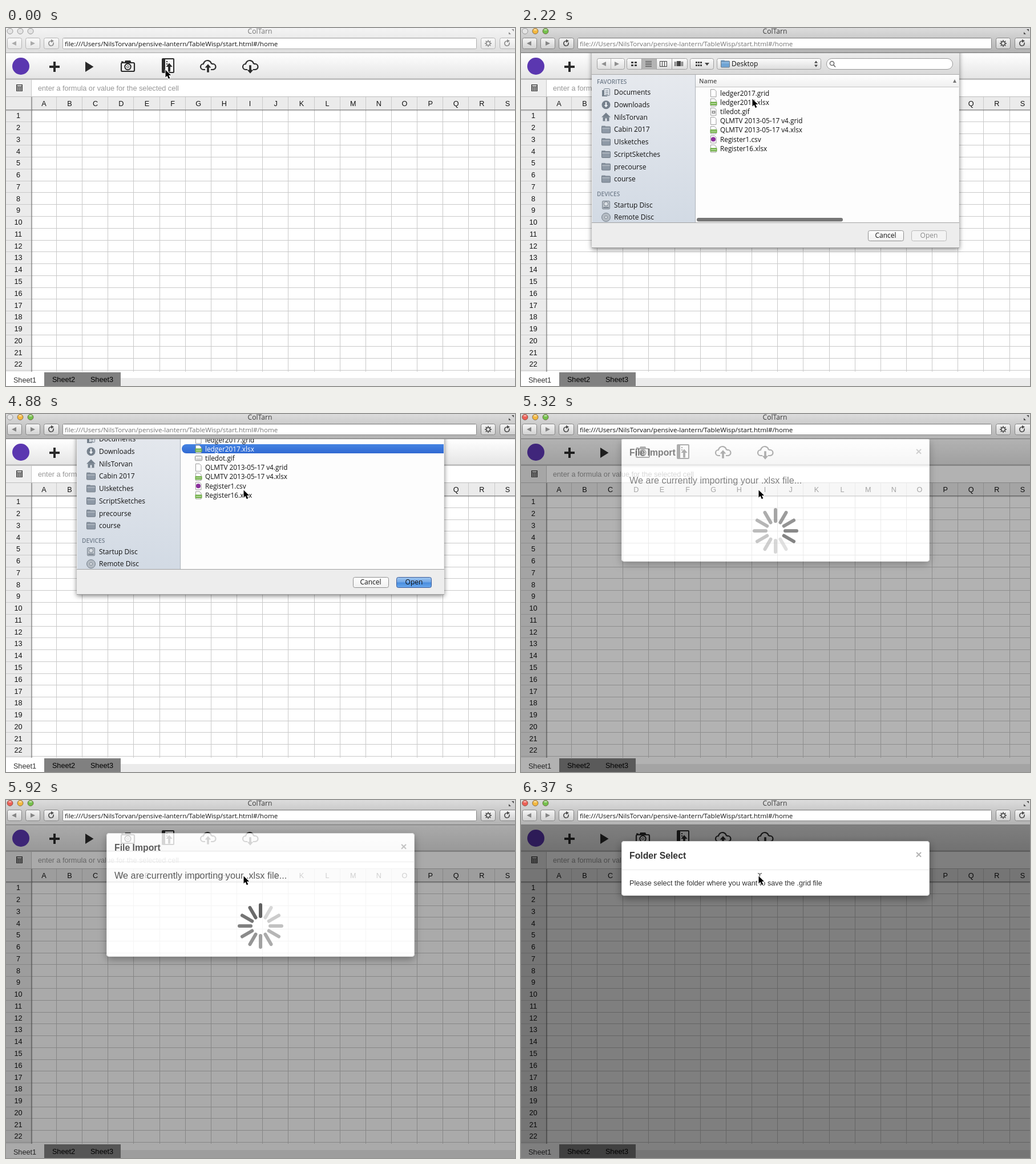
Write an HTML page with a canvas that moves like this. It is 892 px wide and 628 px high and loops after 8000 ms.

```html
<!DOCTYPE html>
<html lang="en">
<head>
<meta charset="utf-8">
<title>Spreadsheet import</title>
<style>
html, body { margin: 0; width: 892px; height: 628px; overflow: hidden; background: #fff; }
canvas { display: block; }
</style>
</head>
<body>
<canvas id="stage" width="892" height="628"></canvas>
<script>
const c = document.getElementById('stage').getContext('2d');
const W = 892, H = 628, TOP = 44, LOOP = 8000, STEP = 147.9;
const UI = '"Open Sans", "Noto Sans", sans-serif';
const PAGE = '"Liberation Sans", Arial, sans-serif';
const INK = '#2b2b2b';

const clamp = v => Math.max(0, Math.min(1, v));
const ease = v => Math.sin(clamp(v) * Math.PI / 2) ** 2;
const mix = (a, b, p) => a + (b - a) * p;

// ---- helpers ----
function rect(x, y, w, h, fill) { c.fillStyle = fill; c.fillRect(x, y, w, h); }
function grad(y0, y1, a, b) {
  const g = c.createLinearGradient(0, y0, 0, y1);
  g.addColorStop(0, a); g.addColorStop(1, b);
  return g;
}
function round(x, y, w, h, r, fill, line) {
  c.beginPath(); c.roundRect(x, y, w, h, r);
  if (fill) { c.fillStyle = fill; c.fill(); }
  if (line) { c.strokeStyle = line; c.lineWidth = 1; c.stroke(); }
}
function circle(x, y, r, fill, line, lw = 1) {
  c.beginPath(); c.arc(x, y, r, 0, 7);
  if (fill) { c.fillStyle = fill; c.fill(); }
  if (line) { c.strokeStyle = line; c.lineWidth = lw; c.stroke(); }
}
function poly(pts, fill, line, lw = 1) {
  c.beginPath();
  for (let i = 0; i < pts.length; i += 2) c.lineTo(pts[i], pts[i + 1]);
  c.closePath();
  if (fill) { c.fillStyle = fill; c.fill(); }
  if (line) { c.strokeStyle = line; c.lineWidth = lw; c.stroke(); }
}
function text(s, x, cy, size, color, font = UI, align = 'left', weight = '') {
  c.font = `${weight} ${size}px ${font}`;
  c.textAlign = align;
  c.fillStyle = color;
  c.fillText(s, x, cy + size * 0.36);
}
function arrow(x, y, dir, color, s = 1) {
  c.save();
  c.translate(x, y); c.scale(s, s * dir);
  poly([0, -8, 6, -1, 2, -1, 2, 8, -2, 8, -2, -1, -6, -1], color);
  c.restore();
}

// ---- browser window ----
function button(x, w, on) {
  round(x + .5, 17.5, w, 19, 3, grad(17, 37, on ? '#f6f6f6' : '#fafafa', on ? '#cfcfcf' : '#e6e6e6'), on ? '#858585' : '#b4b4b4');
}
function reload(x, color) {
  c.beginPath(); c.arc(x, 27, 4.2, -.4, 4.9);
  c.strokeStyle = color; c.lineWidth = 1.6; c.stroke();
  poly([x, 19.8, x + 5, 22.8, x, 25.8], color);
}
function gear(x, y, color) {
  c.strokeStyle = color; c.lineWidth = 1.6;
  for (let i = 0; i < 8; i++) {
    const a = i * Math.PI / 4, u = Math.cos(a), v = Math.sin(a);
    c.beginPath(); c.moveTo(x + u * 3.5, y + v * 3.5); c.lineTo(x + u * 6, y + v * 6); c.stroke();
  }
  circle(x, y, 3.3, null, color, 1.5);
}
function chrome(on, sheet) {
  rect(0, 0, W, TOP, on ? grad(0, 43, '#dcdcdc', '#b2b2b2') : grad(0, 43, '#f4f4f4', '#dedede'));
  rect(0, 43, W, 1, on ? '#747474' : '#a6a6a6');
  ['#ed5f56', '#f3b83f', '#74c04c'].forEach((col, i) => {
    const lit = on && !(sheet && i === 0);
    circle(7 + 18 * i, 5.5, 5, lit ? col : '#e4e4e4', lit ? 'rgba(70,40,20,.55)' : '#969696');
    if (lit) { c.beginPath(); c.ellipse(7 + 18 * i, 3, 2.8, 1.5, 0, 0, 7); c.fillStyle = 'rgba(255,255,255,.5)'; c.fill(); }
  });
  text('ColTarn', 445, 6, 12.1, on ? '#3c3c3c' : '#777', UI, 'center');
  const ic = on ? '#4a4a4a' : '#8b8b8b';
  poly([881, 7, 881, 11, 885, 11], ic);
  poly([886, 2, 890, 2, 890, 6], ic);
  [[2, 25], [34, 25], [66, 26], [832, 25], [865, 30]].forEach(b => button(b[0], b[1], on));
  const nav = on ? '#858585' : '#ababab';
  poly([10, 27, 18, 23, 18, 31], nav);
  poly([51, 27, 43, 23, 43, 31], nav);
  reload(79, ic); gear(845, 27, ic); reload(878, ic);
  round(99.5, 17.5, 725, 19, 2, '#fff', on ? '#868686' : '#adadad');
  rect(100, 18, 724, 1, '#dedede');
  text('file:///Users/NilsTorvan/pensive-lantern/TableWisp/start.html#/home', 103, 27.5, 11.65, sheet ? '#747474' : '#111');
}

// ---- spreadsheet page ----
function cloud(x, y, dir) {
  c.beginPath();
  c.moveTo(x - 5, y + 6); c.lineTo(x - 8, y + 6);
  c.arc(x - 8, y + 1, 5, Math.PI / 2, -1.4);
  c.arc(x - 1, y - 3, 7, 3.3, -.25);
  c.arc(x + 8.5, y + 1, 5, -1.7, Math.PI / 2);
  c.lineTo(x + 5, y + 6);
  c.strokeStyle = INK; c.lineWidth = 2.2; c.stroke();
  arrow(x, y + (dir > 0 ? 3.5 : 5.5), dir, INK, .9);
}
function toolbar() {
  rect(0, 44, W, 46, grad(44, 90, '#ffffff', '#e4e4e4'));
  rect(0, 88, W, 1, '#cfcfcf'); rect(0, 89, W, 1, '#b0b0b0'); rect(0, 90, W, 1, '#c9c9c9');
  circle(26, 67, 15, '#5b37b0');
  rect(76, 66, 18, 4, INK); rect(83, 59, 4, 18, INK);
  poly([139, 59, 153.5, 68, 139, 77], INK);
  // camera
  round(202, 61, 23, 15, 2, null, INK);
  c.lineWidth = 2.2; c.stroke();
  poly([207, 61, 209, 57, 218, 57, 220, 61], INK);
  rect(202, 58.5, 4, 2, INK);
  circle(213.5, 68, 5.2, '#fff', INK, 2);
  circle(213.5, 68, 2, null, INK, 1);
  // book with arrow
  round(274, 54, 20, 24, 1, '#f4f4f4', INK);
  c.lineWidth = 2; c.stroke();
  rect(274, 54, 5, 24, INK);
  [58, 62].forEach(y => rect(281, y, 2, 2, INK));
  arrow(286, 69, 1, INK, .95);
  cloud(354, 67, 1);
  cloud(428, 67, -1);
}
function page() {
  rect(0, TOP, W, H - TOP, '#fff');
  toolbar();
  // formula bar
  rect(0, 91, 45, 29, '#eeeeee');
  rect(44, 91, 1, 29, '#c6c6c6');
  rect(18, 99, 11, 12, '#444');
  rect(19.5, 100.5, 8, 2, '#eee');
  for (let i = 0; i < 9; i++) rect(19.5 + (i % 3) * 3, 104 + (i / 3 | 0) * 2.3, 2, 1.3, '#eee');
  text('enter a formula or value for the selected cell', 56, 105, 12.7, '#979797', PAGE);
  // headers and cells
  rect(0, 120, W, 24, '#ebebeb');
  rect(0, 120, W, 1, '#bdbdbd');
  rect(0, 144, 45, 460, '#ebebeb');
  for (let i = 0; i < 19; i++) {
    const x = Math.floor(88.5 + 45.15 * i);
    if (i < 18) rect(x, 121, 1, 482, '#c9c9c9');
    text(String.fromCharCode(65 + i), 66.4 + 45.15 * i, 132, 12.7, '#111', PAGE, 'center');
  }
  for (let r = 0; r < 22; r++) {
    rect(0, Math.floor(164.3 + 20.77 * r), W, 1, '#c9c9c9');
    text(r + 1, 21.5, 153.8 + 20.76 * r, 12.7, '#111', PAGE, 'center');
  }
  rect(0, 143, W, 1, '#8c8c8c'); rect(0, 144, W, 1, 'rgba(0,0,0,.2)'); rect(0, 145, W, 1, 'rgba(0,0,0,.08)');
  rect(44, 121, 1, 482, '#8c8c8c'); rect(45, 121, 1, 482, 'rgba(0,0,0,.22)'); rect(46, 121, 1, 482, 'rgba(0,0,0,.08)');
  // tabs
  rect(0, 603, W, 25, '#fff');
  rect(201, 614, W - 201, 14, '#ebebeb');
  rect(67, 604, 134, 24, '#808080');
  text('Sheet1', 33, 617, 12.7, '#333', PAGE, 'center');
  text('Sheet2', 101, 616, 12.7, '#000', PAGE, 'center');
  text('Sheet3', 168, 616, 12.7, '#000', PAGE, 'center');
}

// ---- file dialog ----
function folder(x, y, col = '#8e99a6') {
  round(x - 8, y - 6.5, 7, 4, 1, col);
  round(x - 7.5, y - 5, 15, 11, 1, col, '#6f7984');
  rect(x - 7, y - 2.5, 14, 1, 'rgba(255,255,255,.45)');
}
function sideIcon(kind, x, y) {
  const col = '#76818d';
  if (kind === 'folder') folder(x, y);
  if (kind === 'docs') {
    rect(x - 7, y - 4, 9, 11, col);
    round(x - 3.5, y - 6.5, 10, 12, 1, '#dfe4ea', col);
    for (let i = 0; i < 3; i++) rect(x - 1, y - 3 + 3 * i, 5, 1, col);
  }
  if (kind === 'down') { circle(x, y, 7.5, col); arrow(x, y, -1, '#eef1f5', .58); }
  if (kind === 'home') {
    poly([x - 8, y, x, y - 8, x + 8, y], col);
    rect(x - 5.5, y, 11, 7, col);
    rect(x - 1.5, y + 2, 3, 5, '#e2e6ec');
  }
  if (kind === 'disk') {
    round(x - 6.5, y - 7, 13, 14, 1.5, '#bcc2c9', col);
    circle(x, y - 2, 3.8, '#d9dde2', col);
    rect(x - 5, y + 3.5, 10, 2, col);
  }
  if (kind === 'disc') { circle(x, y, 7.5, '#b4bbc3', col); circle(x, y, 2.3, '#e6e9ed', col); }
}
function fileIcon(kind, x, y) {
  if (kind === 'thumb') { round(x - 5.5, y - 4, 12, 8, 1, '#eee', '#888'); rect(x - 4, y + 1, 9, 1, '#aaa'); return; }
  poly([x - 4.5, y - 6.5, x + 2, y - 6.5, x + 5, y - 3.5, x + 5, y + 6.5, x - 4.5, y + 6.5], '#fff', '#9b9b9b');
  if (kind === 'xlsx') { rect(x - 5.5, y - 1, 12, 6, '#6fae45'); rect(x - 4, y + 1.5, 9, 1, '#e6f3dc'); }
  if (kind === 'csv') circle(x, y, 4, '#8b2f9c');
  if (kind === 'gif') { rect(x - 2.5, y - 1.5, 6, 5, '#8a8a8a'); circle(x + .5, y + 1, 1.3, '#eee'); }
}
const SIDE = [
  ['docs', 'Documents'], ['down', 'Downloads'], ['home', 'NilsTorvan'], ['folder', 'Cabin 2017'],
  ['folder', 'UIsketches'], ['folder', 'ScriptSketches'], ['folder', 'precourse'], ['folder', 'course']
];
const FILES = [
  ['grid', 'ledger2017.grid'], ['xlsx', 'ledger2017.xlsx'], ['gif', 'tiledot.gif'],
  ['grid', 'QLMTV 2013-05-17 v4.grid'], ['xlsx', 'QLMTV 2013-05-17 v4.xlsx'],
  ['csv', 'Register1.csv'], ['xlsx', 'Register16.xlsx']
];
function control(x, w) { round(x + .5, 53.5, w, 19, 3, grad(53, 73, '#fdfdfd', '#dcdcdc'), '#a0a0a0'); }
function dialogBar() {
  control(133, 48); control(185, 106); control(296, 41); control(343, 182);
  rect(157, 54, 1, 19, '#b5b5b5');
  rect(211, 54, 26, 19, '#b4b4b4');
  [211, 237, 264].forEach(x => rect(x, 54, 1, 19, '#a2a2a2'));
  poly([141, 63, 149, 59, 149, 67], '#8f8f8f');
  poly([172, 63, 164, 59, 164, 67], '#8f8f8f');
  const d = '#444';
  for (let i = 0; i < 4; i++) {
    rect(193 + (i % 2) * 6, 59 + (i >> 1) * 5, 4, 3, d);
    rect(218, 58 + i * 3, 11, 1, d);
  }
  c.strokeStyle = d; c.lineWidth = 1;
  for (let i = 0; i < 3; i++) c.strokeRect(243.5 + i * 4, 58.5, 4, 9);
  rect(273, 58, 7, 9, d);
  [269, 271, 281, 283].forEach(x => rect(x, 59, 1, 8, d));
  for (let i = 0; i < 6; i++) rect(306 + (i % 3) * 4, 59 + (i / 3 | 0) * 5, 3, 3, d);
  poly([322, 61, 330, 61, 326, 66], d);
  folder(358, 63, '#6fa4d4');
  text('Desktop', 369, 63, 12, '#111');
  poly([514, 61.5, 517, 57.5, 520, 61.5], d);
  poly([514, 64.5, 517, 68.5, 520, 64.5], d);
  round(535.5, 53.5, 221, 19, 10, '#fff', '#999');
  circle(545, 62, 3.6, null, '#666', 1.5);
  c.beginPath(); c.moveTo(547.5, 64.5); c.lineTo(551, 68.5); c.stroke();
}
function openButton(k) {
  if (k < 19) {
    round(684.5, 355.5, 61, 18, 3, '#f3f3f3', '#b9b9b9');
    return text('Open', 715, 364, 12, '#8c8c8c', UI, 'center');
  }
  const glow = k === 32 ? -22 : k === 25 ? 6 : k >= 26 && k < 29 ? 12 : 0;
  const tone = (r, g, b) => `rgb(${r + glow},${g + glow},${b + glow})`;
  const fill = grad(355, 374, tone(162, 200, 240), tone(108, 170, 238));
  fill.addColorStop(.48, tone(112, 166, 230));
  fill.addColorStop(.52, tone(72, 140, 222));
  round(684.5, 355.5, 61, 18, 3, fill, '#3d5c98');
  text('Open', 715, 364, 12, '#111', UI, 'center');
}
function dialog(shift, k) {
  c.save();
  c.beginPath(); c.rect(0, TOP, W, H); c.clip();
  c.translate(0, shift);
  c.save();
  c.shadowColor = 'rgba(0,0,0,.5)'; c.shadowBlur = 8; c.shadowOffsetY = 2;
  rect(124, 30, 644, 356, '#ededed');
  c.restore();
  rect(124, 30, 644, 52, grad(44, 82, '#ececec', '#d9d9d9'));
  dialogBar();
  rect(125, 82, 180, 259, grad(82, 341, '#e6e9ee', '#d2dae4'));
  rect(306, 82, 461, 259, '#fdfdfd');
  rect(306, 82, 461, 21, grad(82, 103, '#fefefe', '#f0f0f0'));
  rect(124, 81, 644, 1, '#a9a9a9');
  rect(306, 103, 461, 1, '#c3c3c3');
  rect(305, 82, 1, 259, '#adb2b9');
  text('Name', 312, 93, 10.8, '#555', UI, 'left', '600');
  poly([757, 96, 763, 96, 760, 90], '#777');
  text('FAVORITES', 133, 94, 10.2, '#737f8d', UI, 'left', '600');
  SIDE.forEach(([kind, name], i) => {
    const y = 113 + 21.7 * i;
    sideIcon(kind, 149, y);
    text(name, 163, y, 12, '#111');
  });
  text('DEVICES', 133, 291, 10.2, '#737f8d', UI, 'left', '600');
  sideIcon('disk', 149, 310.5); text('Startup Disc', 163, 310.5, 12, '#111');
  sideIcon('disc', 149, 332); text('Remote Disc', 163, 332, 12, '#111');
  const picked = k >= 19;
  if (picked) round(308, 122, 459, 16, [8, 0, 0, 8], grad(122, 138, '#4583e2', '#3069d2'));
  FILES.forEach(([kind, name], i) => {
    const y = 114.3 + 16.2 * i;
    fileIcon(kind === 'gif' && picked ? 'thumb' : kind, 337, y);
    text(name, 349, y, 11.8, picked && i === 1 ? '#fff' : '#111');
  });
  const bar = clamp((23 - k) / 4);
  if (bar) round(308, 333, 256, 6.5, 3.2, `rgba(118,118,118,${bar})`);
  rect(124, 341, 644, 1, '#a2a2a2');
  round(608.5, 355.5, 62, 18, 3, grad(355, 374, '#ffffff', '#f0f0f0'), '#8f8f8f');
  text('Cancel', 639, 364, 12, '#111', UI, 'center');
  openButton(k);
  rect(124, 385, 644, 1, '#9b9b9b');
  c.restore();
}

// ---- page modal ----
function spinner(x, y, head) {
  c.lineWidth = 6; c.lineCap = 'round';
  for (let i = 0; i < 12; i++) {
    const age = (head - i + 24) % 12, a = i * Math.PI / 6;
    const v = Math.round(mix(55, 205, age / 11));
    const u = Math.sin(a), w = -Math.cos(a);
    c.strokeStyle = `rgb(${v},${v},${v})`;
    c.beginPath(); c.moveTo(x + 17 * u, y + 17 * w); c.lineTo(x + 37 * u, y + 37 * w); c.stroke();
  }
  c.lineCap = 'butt';
}
function modal(k, kind, shift, alpha, dim) {
  const x = 176, y = 72 + shift, w = 540, h = kind === 'import' ? 217 : 96;
  c.save();
  c.beginPath(); c.rect(0, TOP, W, H); c.clip();
  // the backdrop and shadow stay outside the panel
  c.save();
  c.beginPath(); c.rect(0, TOP, W, H); c.roundRect(x, y, w, h, 5); c.clip('evenodd');
  rect(0, TOP, W, H, `rgba(0,0,0,${dim})`);
  c.shadowColor = `rgba(0,0,0,${.4 * alpha})`; c.shadowBlur = 14; c.shadowOffsetY = 5;
  round(x, y, w, h, 5, '#fff');
  c.restore();
  c.globalAlpha = alpha;
  round(x, y, w, h, 5, '#fff');
  round(x + .5, y + .5, w - 1, h - 1, 5, null, 'rgba(0,0,0,.15)');
  rect(x + 1, y + 50, w - 2, 1, '#e7e7e7');
  text(kind === 'import' ? 'File Import' : 'Folder Select', 190, y + 25, 15.8, '#333', PAGE, 'left', 'bold');
  text('×', 697, y + 23, 19, '#b4b4b4', PAGE, 'center', 'bold');
  if (kind === 'import') {
    text('We are currently importing your .xlsx file...', 190, y + 74, 16.25, '#333', PAGE);
    spinner(446, y + 163, (4 + (k - 36) * 2 + 24) % 12);
  } else {
    text('Please select the folder where you want to save the .grid file', 190, y + 73.5, 12.7, '#333', PAGE);
  }
  c.restore();
}
function modalAt(k) {
  if (k === 35) return ['import', -48, .2, .1];
  if (k === 36) return ['import', -30, .62, .3];
  if (k === 37) return ['import', -10, .86, .45];
  if (k < 40) return ['import', 0, 1, .5];
  if (k === 40) return ['import', -14, .8, .335];
  if (k === 41) return ['import', -40, .3, .12];
  if (k === 42) return ['folder', -14, .7, .34];
  return ['folder', 0, 1, .5];
}

// ---- pointer ----
function pointer(k) {
  let x = 280, y = 72;
  if (k < 2) { x = 279; y = 73; }
  else if (k >= 17) { x = 416; y = 133; }
  else if (k === 16) { x = 411; y = 129; }
  else {
    const p = ease((k - 10) / 5);
    x = mix(280, 405, p); y = mix(72, 124, p);
  }
  if (k >= 43) {
    c.strokeStyle = '#222'; c.lineWidth = 1;
    c.beginPath();
    c.moveTo(415, 128.5); c.lineTo(418.5, 130); c.lineTo(422, 128.5);
    c.moveTo(418.5, 130); c.lineTo(418.5, 137);
    c.stroke();
  }
  c.save();
  c.translate(x + .5, y + .5);
  c.lineJoin = 'round';
  const shape = [0, 0, 0, 13, 3, 10.3, 5.3, 15.5, 7.8, 14.4, 5.5, 9.4, 9.6, 9.4];
  poly(shape, null, '#fff', 2);
  poly(shape, '#000');
  c.restore();
}

function draw(now) {
  const t = now % LOOP;
  const k = Math.floor((t + 5) / STEP);
  c.clearRect(0, 0, W, H);
  page();
  if (k >= 8 && k < 35) {
    const shown = k < 32 ? ease((k - 7.6) / 4.1) : 1 - ease((k - 32.2) / 2.7);
    if (shown > 0) dialog(Math.round(342 * (shown - 1)), k);
  }
  if (k >= 35) modal(k, ...modalAt(k));
  chrome(k >= 1, k >= 9 && k < 35);
  pointer(k);
}

const start = performance.now();
function tick() {
  draw(performance.now() - start);
  requestAnimationFrame(tick);
}
tick();
</script>
</body>
</html>
```
